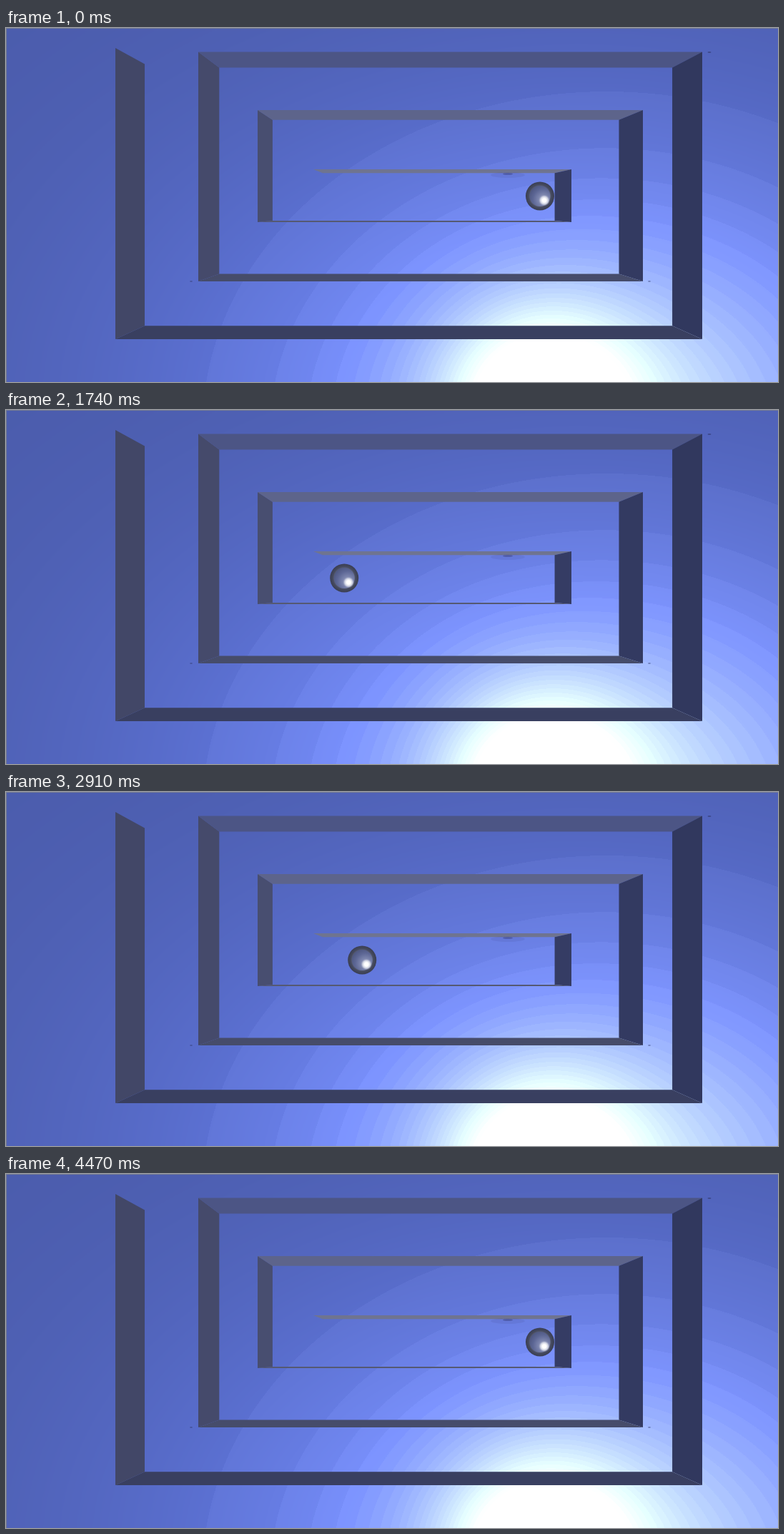
Write an HTML page with a canvas that moves like this. It is 1080x496 px and loops after 4.5 s.

```html
<!DOCTYPE html>
<html lang="en">
<head>
<meta charset="utf-8">
<title>Rolling ball in a spiral maze</title>
<style>
html, body { margin: 0; width: 100%; height: 100%; overflow: hidden; background: #5a70cf; }
canvas { display: block; width: 100vw; height: 100vh; }
</style>
</head>
<body>
<canvas id="stage" width="1080" height="496"></canvas>
<script>
const W = 1080, H = 496;
const STEP = 30, STEPS = 150, TURN = 75;
const RIGHT = 747, LEFT = 393, BALL_Y = 235.5;
const ctx = document.getElementById('stage').getContext('2d');

const scene = document.createElement('canvas');
scene.width = W;
scene.height = H;
const sc = scene.getContext('2d');

const lobe = (dx, dy, size) => Math.exp(-(dx * dx + dy * dy) / (size * size));

// Floor: diffuse light, a wide glow and a tight highlight in faint bands
function paintFloor() {
  const img = sc.createImageData(W, H);
  const band = 6;
  for (let y = 0, i = 0; y < H; y++) {
    for (let x = 0; x < W; x++, i += 4) {
      const blue = 170 + 85 * lobe((x - 800) * 0.9, (y - 525) * 1.3, 540);
      const glow = 105 * lobe(x - 840, (y - 560) * 1.2, 300);
      const spot = 130 * lobe(x - 745, y - 525, 130);
      const shine = Math.round((glow + spot) / band) * band;
      img.data[i] = blue * 0.435 + shine;
      img.data[i + 1] = blue * 0.535 + shine;
      img.data[i + 2] = blue + shine;
      img.data[i + 3] = 255;
    }
  }
  sc.putImageData(img, 0, 0);
}

// Spiral corners: x and y change in turn, from the inside out
const xs = [430, 791, 352, 891, 269, 974, 153];
const ys = [198, 272, 115, 355, 33.5, 436, 28];
const corner = i => [xs[Math.ceil(i / 2)], ys[Math.floor(i / 2)]];

// Foot of a wall: its top edge drawn towards the vanishing point
const foot = ([x, y]) => [x + (559 - x) * 0.101, y + (251 - y) * 0.101];

// Wall tones for top, right, bottom and left, by turn of the spiral
const tones = [
  t => [13 + 7 * t, 50 - 4.5 * t],
  t => [31, 30 - t],
  t => [15 + 5 * t, 39 - 4.5 * t],
  t => [22, 36 - 1.5 * t]
];

function paintWalls() {
  for (let i = 0; i < 12; i++) {
    const a = corner(i), b = corner(i + 1);
    const [sat, light] = tones[i % 4](Math.floor(i / 4));
    sc.fillStyle = `hsl(231, ${sat}%, ${light}%)`;
    sc.beginPath();
    for (const p of [a, b, foot(b), foot(a)]) sc.lineTo(...p);
    sc.fill();
  }
}

function smudge(x, y, rx, ry, alpha) {
  sc.fillStyle = `rgba(48, 55, 105, ${alpha})`;
  sc.beginPath();
  sc.ellipse(x, y, rx, ry, 0, 0, Math.PI * 2);
  sc.fill();
}

function paintDetails() {
  smudge(702, 204.5, 7, 1.3, 0.45);
  smudge(702, 206, 24, 4, 0.1);
  smudge(984, 34, 2.5, 1, 0.6);
  smudge(259, 355, 2, 0.7, 0.6);
  smudge(900, 355, 2, 0.7, 0.6);
  sc.fillStyle = '#747b93';
  sc.fillRect(0, 0, W, 1);
  sc.fillRect(0, 0, 1, H);
}

// Disc with colours spread evenly outwards from a focus of the given reach
function disc(x, y, r, shift, reach, colors) {
  const g = ctx.createRadialGradient(x + shift, y + shift, 0, x + shift, y + shift, reach);
  colors.forEach((c, i) => g.addColorStop(i / (colors.length - 1), c));
  ctx.fillStyle = g;
  ctx.beginPath();
  ctx.arc(x, y, r, 0, Math.PI * 2);
  ctx.fill();
}

function drawBall(x, y) {
  disc(x, y, 20, 0, 20, ['#70758c', '#70758c', '#70758c', '#70758c', '#454a5f', '#3a3e52']);
  disc(x, y, 14.5, 5, 22, ['#a5abc8', '#7b84ad', '#5d6795', '#4c557f']);
  disc(x + 6, y + 6, 8, 0, 8, ['#fff', '#fff', 'rgba(225, 228, 238, .8)', 'rgba(165, 171, 200, 0)']);
}

function ballX(step) {
  const p = step <= TURN ? step / TURN : (STEPS - 1 - step) / (STEPS - 1 - TURN);
  return RIGHT + (LEFT - RIGHT) * p;
}

function draw(time) {
  const step = Math.floor(time / STEP) % STEPS;
  ctx.drawImage(scene, 0, 0);
  drawBall(ballX(step), BALL_Y);
}

paintFloor();
paintWalls();
paintDetails();
const start = performance.now();
function tick() {
  draw(performance.now() - start);
  requestAnimationFrame(tick);
}
tick();
</script>
</body>
</html>
```
